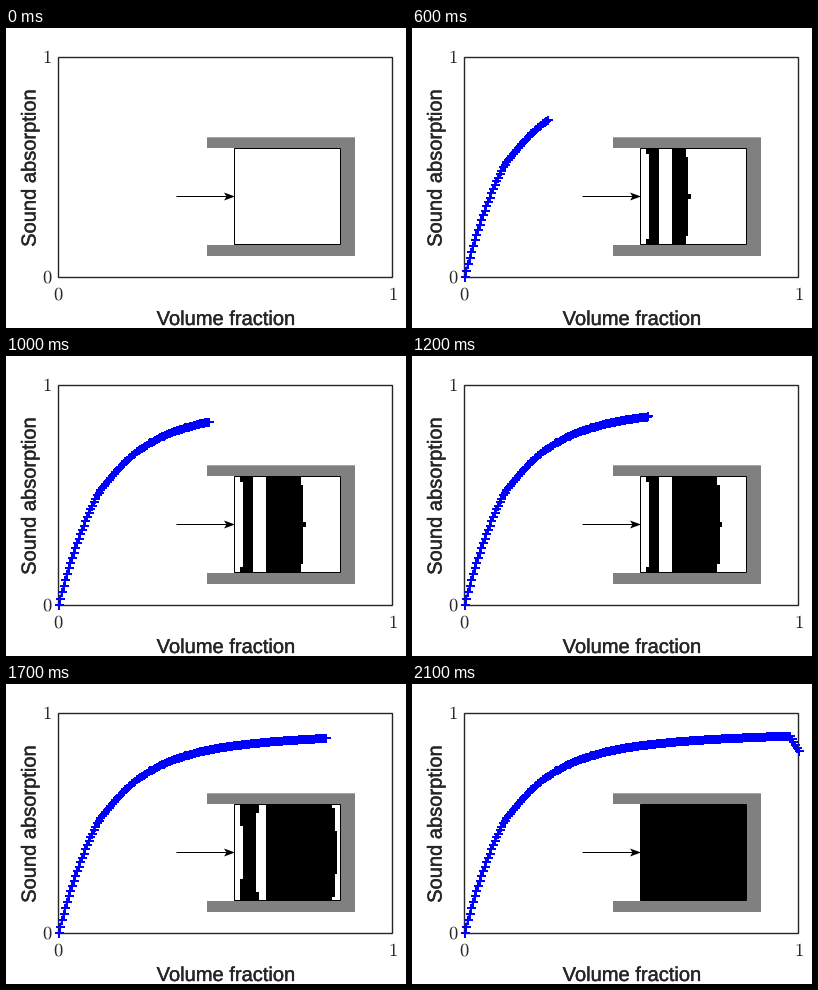
A matplotlib script that plays this animation: 400x300 px, repeating every 2700 ms.

```python
import numpy as np
import matplotlib.pyplot as plt
from matplotlib.animation import FuncAnimation
from matplotlib.patches import Polygon, Rectangle
from matplotlib.patheffects import Normal, Stroke

plt.rcParams.update({"mathtext.fontset": "cm", "toolbar": "None",
                     "path.snap": False, "text.hinting": "none"})

DPI = 100
PX = 72 / DPI                        # points per pixel
DARK, GREY, BLUE = "#262626", "#808080", "#0000ff"
X0, X1, Y0, Y1 = 52.5, 386.5, 249.5, 29.5
COLS, ROWS, MAIN = 40, 36, 12        # design grid; first column of the main layer
LAST = 21

# Fill costs: the cheapest cells turn solid first
edge = np.abs(np.linspace(-1, 1, ROWS))[:, None]     # 1 at the tube walls
col = np.arange(COLS)[None, :]
front_cost = (np.where(col <= 4, 1.5 * np.maximum(4 - col, 0) ** 1.3 - 2 * edge,
                       .65 * (col - 4) - .05 * edge)
              + 10 * (col > 8))[:, :MAIN]            # the air gap closes last
main_cost = (col + 1.3 * edge ** 2)[:, MAIN:]


def fill(cost, n):
    solid = np.zeros(cost.shape)
    solid.flat[np.argsort(cost, axis=None, kind="stable")[:n]] = 1
    return solid


def design(step):
    """Material layout whose solid share grows by 5 % per step."""
    total = max(step - 1, 0) * ROWS * COLS // 20
    front = round(np.interp(step, [3, 5, 6, 13, 18, LAST],
                            [0, 72, 148, 148, 216, ROWS * MAIN]))
    return np.hstack([fill(front_cost, front), fill(main_cost, total - front)])


def absorption(v):
    """Saturating rise with a knee near 0.11 and a drop once the gap closes."""
    rise = .87 * (1 - np.exp(-v * (7.2 - 1.9 * v))) + .035 * v
    knee = .016 * np.exp(-((v - .115) / .03) ** 2)
    return rise + knee - 2.9 * np.maximum(v - .975, 0)


def curve(step):
    v = np.arange(max(10 * (step - 1) + 1, 0)) * .005
    a = np.maximum(absorption(v), 0)
    return X0 + v * (X1 - X0), Y0 + a * (Y1 - Y0)


fig = plt.figure(figsize=(4, 3), dpi=DPI, facecolor="white")
ax = fig.add_axes([0, 0, 1, 1])


def box(x0, y0, x1, y1, **kw):
    ax.add_patch(Rectangle((x0, y0), x1 - x0, y1 - y0, fill=False, **kw))


def label(x, y, text, **kw):
    ax.text(x, y, text, family="Liberation Sans", size=20.1 * PX, color=DARK,
            ha="center", va="baseline", rotation_mode="anchor",
            path_effects=[Stroke(linewidth=.4 * PX, foreground=DARK), Normal()],
            **kw)


# Plot frame and labels
box(X0, Y1, X1, Y0, ec=DARK, lw=1.4 * PX)
for x, y, s in [(52, 264.8, 0), (387, 264.8, 1), (41, 248, 0), (41, 28.3, 1)]:
    ax.text(x, y, f"${s}$", size=18.5 * PX, color=DARK,
            ha="center", va="center_baseline")
label(220, 297, "Volume fraction")
label(29.5, 140, "Sound absorption", rotation=90)

# Tube walls, sample and incoming wave
ax.add_patch(Polygon([(201, 109.3), (349, 109.3), (349, 228), (201, 228),
                      (201, 217), (335, 217), (335, 120), (201, 120)],
                     fc=GREY, lw=0))
sample = ax.imshow(design(0), cmap="gray_r", vmin=0, vmax=1, aspect="auto",
                   interpolation="nearest", extent=(229, 334, 216, 121))
box(228.5, 120.5, 334.5, 216.5, ec="black", lw=PX)
ax.plot([171, 221], [168.5, 168.5], color="black", lw=PX)
ax.add_patch(Polygon([(229, 168.5), (218, 164.5), (220.5, 168.5),
                      (218, 172.5)], fc="black", lw=0))

line, = ax.plot([], [], "-+", color=BLUE, lw=1.5 * PX, ms=9 * PX,
                mew=2 * PX, zorder=5)

ax.set(xlim=(0, 400), ylim=(300, 0))
ax.axis("off")


def update(i):
    step = min(i, LAST)
    sample.set_data(design(step))
    line.set_data(*curve(step))
    return sample, line


anim = FuncAnimation(fig, update, frames=27, interval=100, repeat=True,
                     repeat_delay=0)
plt.show()
```
